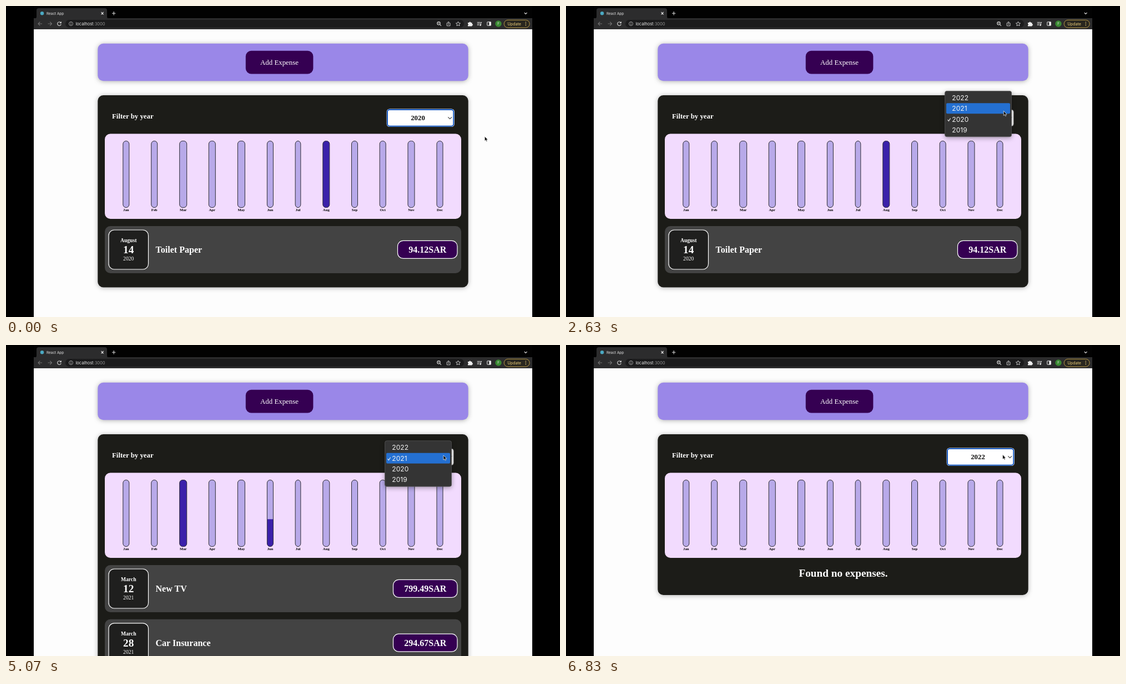
Animation of 998x561 px, one loop 6.86 s. Source, as an HTML page:

```html
<!DOCTYPE html>
<html lang="en">
<head>
<meta charset="utf-8">
<title>Expense chart</title>
<style>
html, body { margin: 0; width: 100%; height: 100%; overflow: hidden; background: #000; }
svg { display: block; }
.ui { font-family: Inter, Roboto, sans-serif; fill: #e8e8e8; }
.page { font-family: "Liberation Serif", "Times New Roman", serif; font-weight: 700; fill: #fff; }
.mid { text-anchor: middle; }
.plain { font-weight: 400; }
.line { fill: none; stroke: #d8d8d8; stroke-width: 1.1; }
.card { filter: drop-shadow(0 1px 4px rgba(0,0,0,.3)); }
.pill { fill: #350052; stroke: #fff; stroke-width: 1.2; }
</style>
</head>
<body>
<svg id="stage" width="998" height="561" viewBox="0 0 998 561"></svg>
<script>
const LOOP = 6860;
const SWAPS = [2940, 5890];            // the chosen year takes effect
const MENUS = [                        // opening, highlight change, fade out
  { open: 1050, hover: 1850, fade: 2720, end: 2870, top: 153, from: 2, to: 1, year: 2 },
  { open: 4650, hover: 5230, fade: 5640, end: 5825, top: 172.4, from: 1, to: 0, year: 1 }
];
const POINTER = [                      // time, x, y
  [0, 862.3, 235.2], [120, 862.3, 235.2], [850, 793, 201.2], [1650, 793, 201.2], [2050, 788.3, 189.2],
  [3900, 788.3, 189.2], [4050, 788.3, 190], [4400, 788, 199], [5050, 788, 199], [5400, 786.6, 190],
  [6430, 786.6, 190], [6800, 786.6, 197.8], [6860, 786.6, 197.8]
];
const ROW = 19.3;
const MONTHS = "Jan Feb Mar Apr May Jun Jul Aug Sep Oct Nov Dec".split(" ");
const BAR_X = [216.3, 267.2, 319.2, 371.3, 423.9, 475.9, 526, 576.8, 628, 678.7, 730, 781.5];
const BAR_W = [11, 11, 13, 12, 13, 11, 9.7, 12, 11, 11, 12, 11];
const FILLS = [{ Aug: 1 }, { Mar: 1, Jun: .41 }, {}];
const CARD_H = [346.5, 450, 290];

const rect = (x, y, w, h, r, fill, extra = "") =>
  `<rect x="${x}" y="${y}" width="${w}" height="${h}" rx="${r}" fill="${fill}" ${extra}/>`;
const text = (x, y, size, str, extra = "") => `<text x="${x}" y="${y}" font-size="${size}" ${extra}>${str}</text>`;
const line = (d, extra = "") => `<path class="line" d="${d}" ${extra}/>`;
const mid = 'class="mid"';

function expense(y, month, day, year, title, price, w) {
  return rect(178, y, 642, 85, 10, "#434343") +
    rect(185, y + 7, 71.5, 71, 10, "#1f1f1e", 'stroke="#fff" stroke-width="1.2"') +
    text(220.7, y + 29, 9.64, month, mid) +
    text(220.7, y + 49, 19.27, day, mid) +
    text(220.7, y + 62, 9.64, year, 'class="mid plain"') +
    text(269.5, y + 48, 16.06, title) +
    rect(813 - w, y + 26.4, w, 32, 10, "", 'class="pill"') +
    text(813 - w / 2, y + 48, 16.06, price + "SAR", mid);
}

const browser = `<g class="ui">
  ${rect(50, 0, 898, 561, 0, "#fdfdfd")}
  ${rect(50, 0, 898, 23, 0, "#020202")}
  <path d="M51 23q4 0 4-4V8q0-4 4-4H178q4 0 4 4V19q0 4 4 4Z" fill="#2c2c2d"/>
  ${rect(50, 22, 898, 20, 0, "#2c2c2d")}
  ${rect(107, 25, 718, 14, 7, "#1b1b1c")}
  <circle cx="65" cy="13.2" r="3.2" fill="#4ba9c2"/>
  ${text(73, 15.7, 6.4, "React App")}
  ${line("M171.5 11l4.2 4.4m0-4.4l-4.2 4.4M191 13.2h6.4m-3.2-3.2v6.4M933.8 12l2.4 2.4 2.4-2.4")}
  ${line("M65 32h-7m3.3-3.3L58 32l3.3 3.3M75.500 32h7m-3.300-3.300l3.300 3.300-3.300 3.300", 'style="stroke:#737373"')}
  ${line("M98.500 30a3.300 3.300 0 1 0 .7 2.800M99.300 28.300v2.300h-2.300")}
  ${line("M117 31.500v2.500m0-4.500v.9", 'style="stroke:#aaa"')}
  <circle class="line" cx="117" cy="32" r="3.500" style="stroke:#aaa;stroke-width:.9"/>
  ${text(125.5, 34.600, 7.500, 'localhost<tspan fill="#969696">:3000</tspan>')}
  <circle class="line" cx="779.500" cy="31.300" r="2.700"/>
  ${line("M781.500 33.300l2.500 2.500M778.300 31.300h2.400")}
  ${line("M795.500 30.800h-1.300v5h5.800v-5h-1.300M797.100 34v-5.500m-1.700 1.600l1.700-1.700 1.700 1.700", 'style="stroke-width:.9"')}
  ${line("M814.500 28.200l1.200 2.600 2.800.3-2.100 1.900.6 2.800-2.500-1.400-2.500 1.400.6-2.800-2.100-1.900 2.800-.3Z", 'style="stroke-width:.9"')}
  <path d="M832 30h2.300a1.500 1.500 0 0 1 3 0h2.200v2.300a1.500 1.500 0 0 1 0 3v1.200h-7.500v-2a1.300 1.300 0 0 0 0-2.500Z" fill="#eee"/>
  ${line("M848.800 29.500h5.500m-5.500 2.300h5.500m-5.500 2.300h3.300M857.200 29.500h-1.700v5")}
  <circle cx="854.600" cy="34.500" r="1.400" fill="#ddd"/>
  ${rect(866.800, 28.800, 6.600, 6.400, .5, "none", 'stroke="#eee"')}
  ${rect(870.300, 28.800, 3.400, 6.400, 0, "#eee")}
  <circle cx="887" cy="32" r="5.700" fill="#3a8a32"/>
  ${text(887, 34.300, 6, "F", mid)}
  ${rect(897.200, 25.300, 46, 13.800, 6.900, "#29271f", 'stroke="#b99a45"')}
  ${text(903.500, 34.600, 7.100, "Update", 'fill="#efd17a"')}
  ${[29.200, 32, 34.800].map(y => `<circle cx="936.300" cy="${y}" r=".8" fill="#efd17a"/>`).join("")}
</g>`;

const bars = MONTHS.map((m, i) => {
  const w = BAR_W[i], x = BAR_X[i] - w / 2;
  return rect(x, 243.5, w, 120, 5.5, "#b8a9e9") +
    rect(x, 243.5, w, 120, 5.5, "#3b20aa", 'class="fill"') +
    rect(x, 243.5, w, 120, 5.5, "none", 'stroke="#2b2b30"') +
    text(BAR_X[i], 370, 6.7, m, 'class="mid" fill="#000"');
}).join("");

const page = `<g class="page">
  ${rect(165.3, 67.8, 667.4, 67.5, 10, "#9a87e8", 'class="card"')}
  ${rect(431.8, 80.8, 121.6, 41.7, 10, "#350052")}
  ${text(492.5, 106, 12.85, "Add Expense", 'class="mid plain"')}
  ${rect(165.3, 161, 667.4, 346, 10, "#1c1c18", 'class="card" id="card"')}
  ${text(191, 203, 12.85, "Filter by year")}
  <g id="ring">${rect(685.6, 185.5, 122.3, 32.6, 5.5, "#fff")}</g>
  ${rect(687, 187, 119.3, 29.8, 4, "#fff", 'id="select"')}
  ${text(742, 206.4, 12.85, "", 'class="mid" fill="#111" id="year"')}
  ${line("M796.3 200.3l3.4 3.4 3.4-3.4", 'style="stroke:#444;stroke-width:1.2"')}
  ${rect(178, 230.6, 642, 153.4, 10, "#f2dbfe")}
  ${bars}
  <g class="list">${expense(397, "August", 14, 2020, "Toilet Paper", "94.12", 107.5)}</g>
  <g class="list">
    ${expense(397, "March", 12, 2021, "New TV", "799.49", 115.5)}
    ${expense(494.8, "March", 28, 2021, "Car Insurance", "294.67", 115.5)}
  </g>
  <g class="list">${text(499.5, 418, 19.27, "Found no expenses.", mid)}</g>
</g>`;

const menu = `<g id="menu" class="ui" style="filter:drop-shadow(0 2px 4px rgba(0,0,0,.35))">
  ${rect(682.6, .4, 120, 82.4, 3.5, "#343434", 'stroke="#565656" stroke-width=".8"')}
  ${rect(685, 0, 115, 19, 2, "#2470d2", 'id="hover"')}
  ${[2022, 2021, 2020, 2019].map((y, i) => text(695.3, 17 + ROW * i, 12.1, y, 'fill="#f2f2f2"')).join("")}
  ${line("M687.6 -3.4l1.8 2.4 3.2-5", 'id="tick" style="stroke:#f2f2f2"')}
</g>`;

const pointer = `<path id="pointer" d="M0 0V8.300L1.900 6.600 3.200 9.400 4.600 8.800 3.400 6.100H5.800Z"
  fill="#0a0a0a" stroke="#f4f4f4" stroke-width=".7" stroke-linejoin="round"/>`;

const $ = id => document.getElementById(id);
$("stage").innerHTML = browser + page + menu + pointer;
const fills = document.querySelectorAll(".fill");
const lists = document.querySelectorAll(".list");
const show = (el, on) => el.style.display = on ? "" : "none";
const clamp = v => Math.min(1, Math.max(0, v));

function pointerAt(t) {
  const i = POINTER.findIndex(p => p[0] > t);
  const [t0, x0, y0] = POINTER[i - 1], [t1, x1, y1] = POINTER[i];
  const p = (t - t0) / (t1 - t0), e = p * p * (3 - 2 * p);
  return [x0 + (x1 - x0) * e, y0 + (y1 - y0) * e];
}

function draw(t) {
  const state = SWAPS.filter(s => t >= s).length;
  const ease = state ? 1 - (1 - clamp((t - SWAPS[state - 1]) / 300)) ** 1.8 : 1;
  MONTHS.forEach((m, i) => {
    const next = FILLS[state][m] || 0, last = state ? FILLS[state - 1][m] || 0 : next;
    fills[i].style.clipPath = `inset(${(1 - last - (next - last) * ease) * 100}% 0 0 0)`;
  });
  lists.forEach((l, i) => show(l, i === state));
  $("card").setAttribute("height", CARD_H[state]);
  $("year").textContent = 2020 + state;

  const focused = !MENUS.some((m, i) => t >= m.open && t < SWAPS[i]);
  show($("ring"), focused);
  $("select").setAttribute("stroke", focused ? "#1557c0" : "#777");
  $("select").setAttribute("stroke-width", focused ? 2 : .8);

  const m = MENUS.find(m => t >= m.open && t < m.end);
  show($("menu"), m);
  if (m) {
    $("menu").setAttribute("transform", `translate(0 ${m.top})`);
    $("menu").style.opacity = 1 - clamp((t - m.fade) / (m.end - m.fade)) * .9;
    $("hover").setAttribute("y", 3 + ROW * (t < m.hover ? m.from : m.to));
    $("tick").setAttribute("transform", `translate(0 ${17 + ROW * m.year})`);
  }
  $("pointer").setAttribute("transform", `translate(${pointerAt(t)})`);
}

const start = performance.now();
(function frame() {
  draw((performance.now() - start) % LOOP);
  requestAnimationFrame(frame);
})();
</script>
</body>
</html>
```
